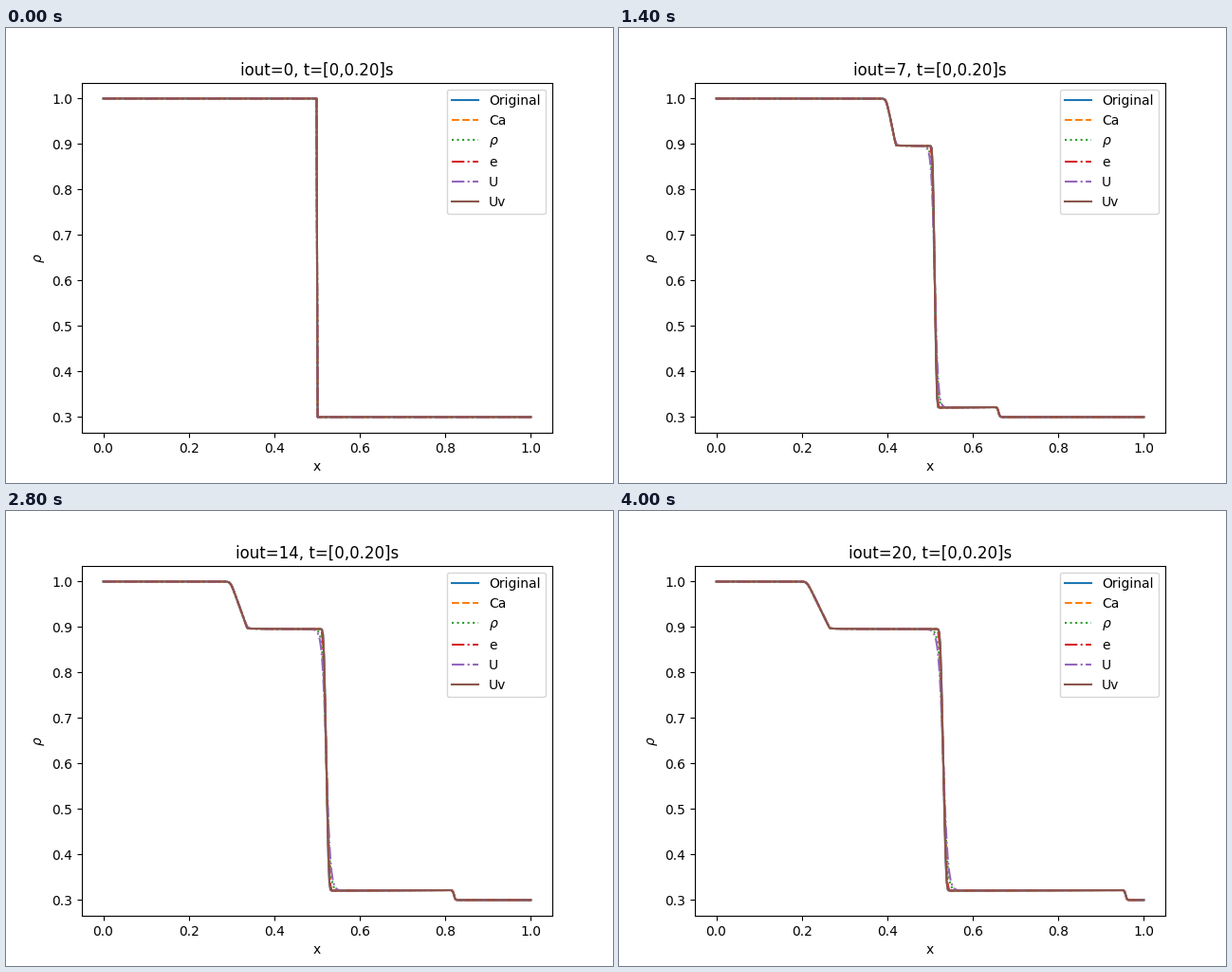
These frames come from a looping animation (640x480 px, 4200 ms). A matplotlib script:

```python
import numpy as np
import matplotlib.pyplot as plt
from matplotlib.animation import FuncAnimation

FRAMES = 21
END_TIME = 0.2
LEFT, STAR_LEFT, STAR_RIGHT, RIGHT = 1.0, 0.8955, 0.321, 0.3
x = np.linspace(0, 1, 400)

# label, line style, contact width factor, contact sharpness, fan tail width
SCHEMES = [
    ("Original", "-", 1.0, 0.3, 0.0006),
    ("Ca", "--", 1.1, 0.2, 0.0008),
    (r"$\rho$", ":", 1.35, 0.0, 0.0008),
    ("e", "-.", 1.15, 0.2, 0.0008),
    ("U", "-.", 1.6, 0.0, 0.0028),
    ("Uv", "-", 1.0, 0.3, 0.0006),
]


def soft_ramp(d, width):
    return width * np.logaddexp(0, d / width)


def soft_step(d, width, sharpness=0.0):
    z = d / width
    return 0.5 * (1 + np.tanh(z + sharpness * z**3))


def density(t, factor, sharpness, tail_width):
    """Shock tube: rarefaction fan, contact and shock leaving x = 0.5."""
    if t == 0:
        return np.where(x < 0.5, LEFT, RIGHT)
    smear = (t / END_TIME) ** (1 / 3)
    head, tail = 0.497 - 1.425 * t, 0.5035 - 1.19 * t
    contact, shock = 0.5 + 0.154 * t, 0.5 + 2.287 * t

    fan = (soft_ramp(x - head, 0.0032 * smear)
           - soft_ramp(x - tail, tail_width * smear)) / (tail - head)
    past_contact = soft_step(x - contact, 0.0068 * smear * factor, sharpness)
    past_shock = soft_step(x - shock, 0.0028)

    upper_drift = 0.0013 * fan * np.exp(-np.clip(x - tail, 0, None) / 0.06)
    lower_drift = 0.0012 * ((x - contact) / (shock - contact) - 0.4)
    return (LEFT - (LEFT - STAR_LEFT) * fan
            - (STAR_LEFT - STAR_RIGHT) * past_contact
            - (STAR_RIGHT - RIGHT) * past_shock
            + upper_drift * (1 - past_contact)
            + lower_drift * past_contact * (1 - past_shock))


fig, ax = plt.subplots(figsize=(6.4, 4.8), dpi=100)
lines = [ax.plot([], [], style, label=label)[0]
         for label, style, *_ in SCHEMES]
ax.set_xlim(-0.05, 1.05)
ax.set_ylim(0.265, 1.035)
ax.set_xlabel("x")
ax.set_ylabel(r"$\rho$")
ax.legend(loc="upper right")
title = ax.set_title("")


def update(frame):
    t = END_TIME * frame / (FRAMES - 1)
    for line, (_, _, *shape) in zip(lines, SCHEMES):
        line.set_data(x, density(t, *shape))
    title.set_text(f"iout={frame}, t=[0,{END_TIME:.2f}]s")
    return [*lines, title]


anim = FuncAnimation(fig, update, frames=FRAMES, interval=200,
                     repeat=True, repeat_delay=0)
plt.show()
```
